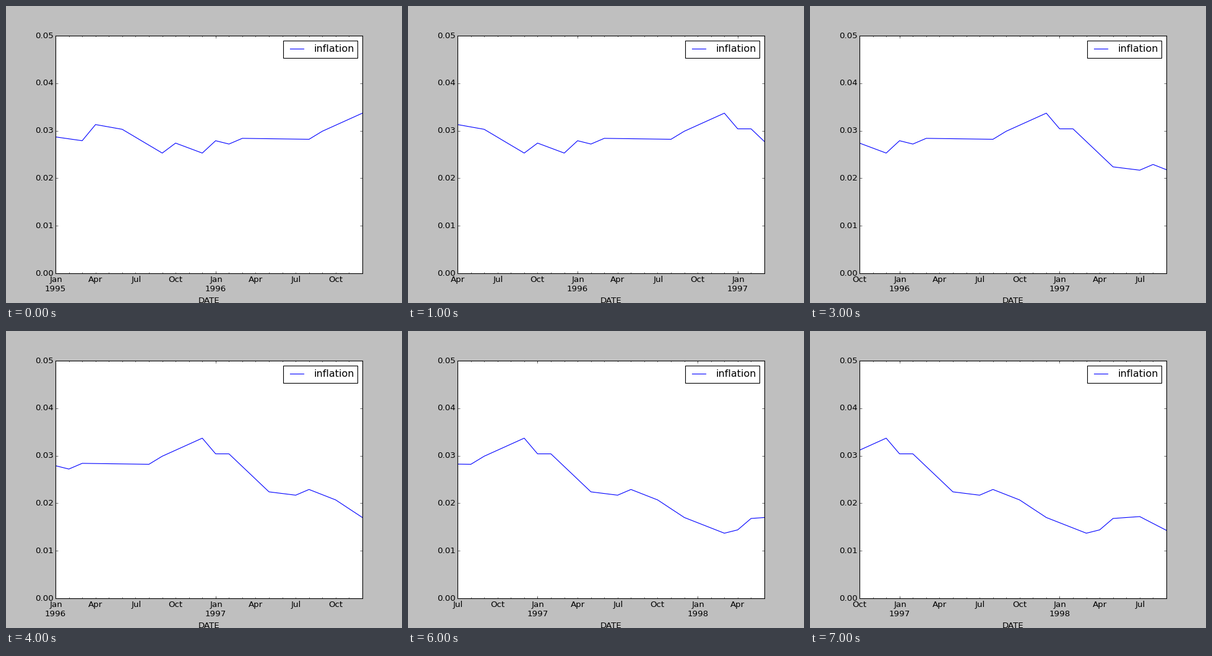
Recreate the animation shown at these times as a matplotlib script. Size 640 by 480 pixels, loop 8 s.

```python
import matplotlib.pyplot as plt
import numpy as np
from matplotlib.animation import FuncAnimation
from matplotlib.textpath import TextPath

plt.style.use("classic")
plt.rcParams.update({
    "font.family": "DejaVu Sans",
    "savefig.facecolor": "auto",
    "savefig.dpi": "figure",
    "ytick.major.pad": 3.1,
})

DPI = 80
FIRST_YEAR = 1995
WINDOW = 24      # months in view
STEP = 3         # months moved per frame
FRAMES = 8
FONT_PX = 12 * DPI / 72
QUARTERS = ["Jan", "Apr", "Jul", "Oct"]

# Turning points of the curve: month -> rate in tenths of a percent.
TURNS = {
    0: 28.7, 2: 27.9, 3: 31.3, 5: 30.3, 8: 25.3, 9: 27.4, 11: 25.3,
    12: 27.9, 13: 27.2, 14: 28.4, 19: 28.2, 20: 29.9, 23: 33.7,
    24: 30.4, 25: 30.4, 28: 22.4, 30: 21.7, 31: 22.9, 33: 20.7,
    35: 17.0, 38: 13.7, 39: 14.4, 40: 16.8, 42: 17.2, 44: 14.3,
}
MONTHS = np.arange(WINDOW + STEP * (FRAMES - 1))
INFLATION = np.interp(MONTHS, list(TURNS), list(TURNS.values())) / 1000

fig = plt.figure(figsize=(8, 6), dpi=DPI, facecolor="0.75")
ax = fig.add_axes([0.125, 0.1, 0.775, 0.8])
ax.xaxis.remove_overlapping_locs = False
line, = ax.plot([], [], "b-", lw=1, label="inflation")
ax.set_ylim(0, 0.05)
ax.set_yticks(np.arange(6) / 100, [f"{v / 100:.2f}" for v in range(6)])
ax.set_xlabel("DATE")
legend = ax.legend(loc="upper right", handletextpad=0.62)
legend.get_texts()[0].set_x(1.4)

# Quarter names stay at fixed places; only their words change.
left, top = ax.bbox.x0, ax.bbox.y0 - 4 * DPI / 72
quarter_px = ax.bbox.width * STEP / (WINDOW - 1)
names = [ax.text(0, top, "", va="top", transform=None)
         for _ in range(WINDOW // STEP)]


def ink_center(word):
    box = TextPath((0, 0), word, size=FONT_PX).get_extents()
    return (box.x0 + box.x1) / 2


def update(frame):
    start = frame * STEP
    months = MONTHS[start:start + WINDOW]
    line.set_data(months, INFLATION[months])
    januaries = months[months % 12 == 0]
    ax.set_xticks(januaries, [f"\n{FIRST_YEAR + m // 12}" for m in januaries])
    ax.set_xticks(months, minor=True)
    ax.set_xlim(months[0], months[-1])
    for i, name in enumerate(names):
        word = QUARTERS[(frame + i) % 4]
        name.set_text(word)
        name.set_x(left + i * quarter_px - ink_center(word))
    return line, *names


anim = FuncAnimation(fig, update, frames=FRAMES, interval=1000,
                     init_func=lambda: update(0), repeat=True, blit=False)
plt.show()
```
